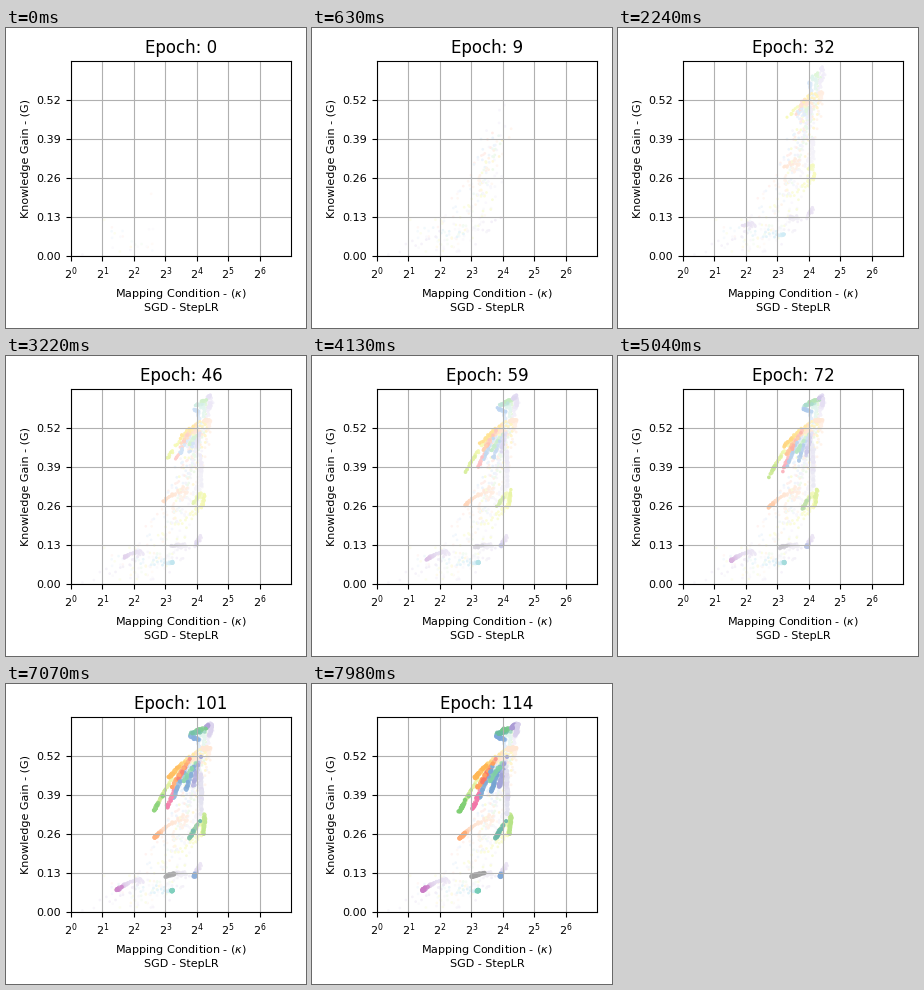
Write a matplotlib script that moves like this. It is 300x300 px and loops after 8 s.

```python
import numpy as np
import matplotlib.pyplot as plt
from matplotlib.animation import FuncAnimation
from matplotlib.colors import to_rgb

EPOCHS = 115
LOOP_MS = 8000
WARMUP = 18
DECAY = 21

# peak x, peak y, final x, final y (stage pixels), wander back along path, early and late colour
LAYERS = [
    (139, 193, 110, 207, 0.05, "#b9a0d8", "#b548b0"),
    (192, 66, 147, 129, 0.08, "#e6f032", "#4dbb3c"),
    (184, 130, 147, 155, 0.06, "#ffb98a", "#ff8a3c"),
    (204, 61, 161, 96, 0.18, "#ffd21e", "#ff9a10"),
    (193, 68, 160, 126, 0.14, "#ff9a80", "#ee3f86"),
    (195, 64, 170, 99, 0.22, "#ffa088", "#f5432b"),
    (199, 62, 165, 105, 0.22, "#ffb070", "#ff7a1e"),
    (188, 74, 167, 116, 0.22, "#9cc4f0", "#4a88c4"),
    (194, 74, 179, 110, 0.25, "#a8c8f0", "#3f7fc0"),
    (180, 188, 159, 193, 0.25, "#c9bfdc", "#7a7a7a"),
    (167, 207, 166, 207, 0.05, "#70c4e4", "#3fb89a"),
    (195, 181, 188, 193, 0.05, "#b9a0d8", "#4f86c6"),
    (197, 150, 199, 130, 0.5, "#ecf23c", "#9ad85a"),
    (198, 134, 183, 156, 0.25, "#dcee3c", "#2f9a86"),
    (196, 56, 184, 52, 0.3, "#8fbcf0", "#4a86cc"),
    (204, 43, 190, 47, 0.3, "#9ee48a", "#3cae5c"),
    (202, 47, 184, 50, 0.3, "#9edcc8", "#2ca07a"),
    (203, 52, 206, 39, 0.4, "#d4c8ec", "#c8bce4"),
    (206, 39, 200, 44, 0.3, "#d0c4ec", "#8a74c4"),
    (196, 72, 187, 104, 0.3, "#cfc4ec", "#7d7fc8"),
    (196, 115, 194, 88, 0.6, "#dcd2ec", "#cfc8e6"),
    (195, 130, 195, 80, 0.6, "#dcd8ec", "#d4d4e8"),
    (205, 64, 196, 65, 0.4, "#ffc8a0", "#ffdcc0"),
    (195, 76, 177, 99, 0.3, "#a6e49a", "#4cba86"),
]


def to_data(p):
    """Stage pixels to (log2 of condition, gain)."""
    return np.stack([(p[..., 0] - 65) * 7 / 220, (228 - p[..., 1]) / 300], axis=-1)


def build_trails():
    rng = np.random.default_rng(12)
    n = len(LAYERS)
    peak = np.array([row[:2] for row in LAYERS], float)
    final = np.array([row[2:4] for row in LAYERS], float)
    wander = np.array([row[4] for row in LAYERS])
    early = np.array([to_rgb(row[5]) for row in LAYERS])
    late = np.array([to_rgb(row[6]) for row in LAYERS])

    start = np.column_stack([rng.uniform(104, 148, n), rng.uniform(198, 226, n)])
    start[0] = 72, 226
    start[1] = 113, 213
    start[2] = 143, 167

    speed = rng.uniform(4, 7, n)
    bend = rng.uniform(1.3, 2.5, n)
    spots, colors = [], []
    for e in range(EPOCHS):
        grow = 1 - np.exp(-e / speed)
        rise = np.column_stack([grow, grow ** bend])
        drift = 1 - np.exp(-max(0, e - WARMUP) / DECAY)
        drift = drift * np.clip(1 - wander * np.abs(rng.normal(0, 1, n)), 0, 1)
        slide = np.column_stack([drift, drift ** 1.4])
        pos = start + (peak - start) * rise + (final - peak) * slide
        pos += rng.normal(0, 1, (n, 2)) * (4.5 * np.exp(-e / 11) + 0.45)
        pos[:, 1] = np.minimum(pos[:, 1], 227)
        spots.append(pos)

        k = e / (EPOCHS - 1)
        mix = np.clip((k - 0.3) / 0.6, 0, 1)
        tint = early + (late - early) * mix
        strength = 0.08 + 0.64 * k ** 0.75
        colors.append(1 - (1 - tint) * strength)
    return to_data(np.concatenate(spots)), np.concatenate(colors)


offsets, colors = build_trails()
diameter = 2.6 + 1.8 * np.arange(EPOCHS) / (EPOCHS - 1)
sizes = np.repeat((diameter * 0.72) ** 2, len(LAYERS))

fig, ax = plt.subplots(figsize=(3, 3), dpi=100)
ax.set_xlim(0, 7)
ax.set_ylim(0, 0.65)
ax.set_xticks(range(7), [f"$2^{k}$" for k in range(7)])
ax.set_yticks(np.arange(5) * 0.13, [f"{0.13 * k:.2f}" for k in range(5)])
ax.tick_params(labelsize=8)
ax.set_xlabel("Mapping Condition - ($\\kappa$)\nSGD - StepLR", fontsize=8)
ax.set_ylabel("Knowledge Gain - (G)", fontsize=8)
ax.grid(True)
title = ax.set_title("Epoch: 0", fontsize=12)
fig.tight_layout()
fig.subplots_adjust(top=0.89)

dots = ax.scatter(offsets[:, 0], offsets[:, 1], s=sizes, c=colors, linewidths=0)


def update(epoch):
    shown = (epoch + 1) * len(LAYERS)
    dots.set_offsets(offsets[:shown])
    dots.set_sizes(sizes[:shown])
    dots.set_facecolors(colors[:shown])
    title.set_text(f"Epoch: {epoch}")
    return dots, title


anim = FuncAnimation(fig, update, frames=EPOCHS, interval=LOOP_MS / EPOCHS,
                     init_func=lambda: update(0), repeat=True, repeat_delay=0)
plt.show()
```
